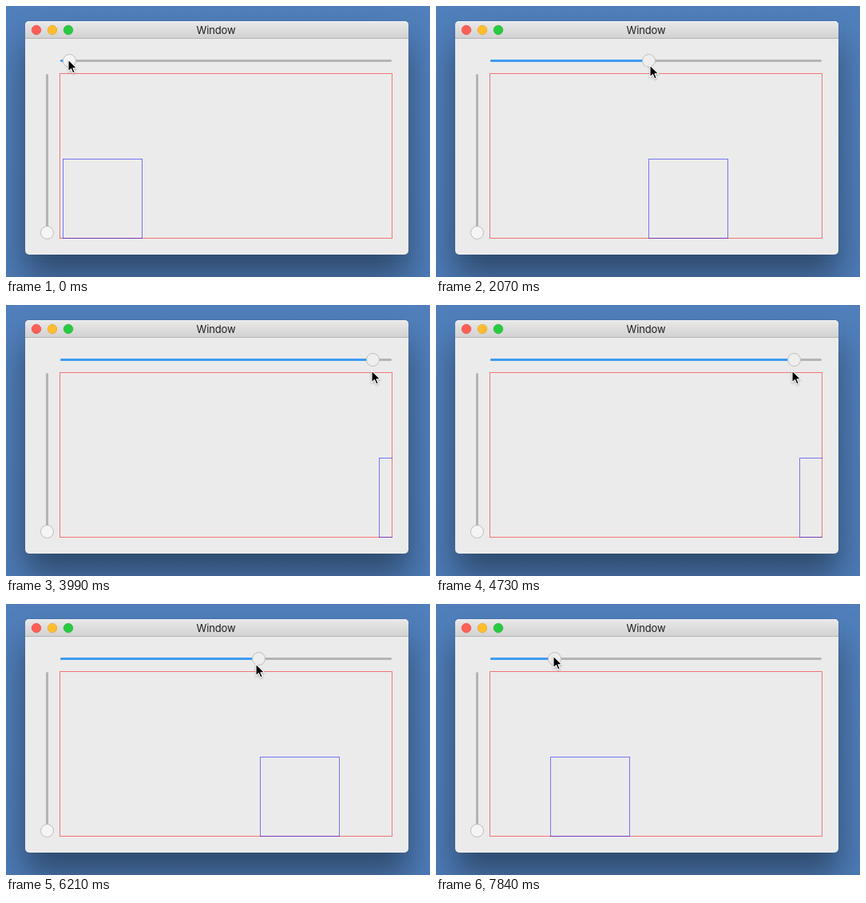
These frames come from a looping animation (531x339 px, 7990 ms). An HTML page:

```html
<!DOCTYPE html>
<html lang="en">
<head>
<meta charset="utf-8">
<title>Window</title>
<style>
  html, body { margin: 0; width: 531px; height: 339px; overflow: hidden; }
  body { position: relative; background: linear-gradient(#507fbb, #4d7bb6); }
  .window {
    position: absolute; left: 24px; top: 19px; width: 480px; height: 292px;
    border-radius: 5px; background: #ebebeb;
    box-shadow: 0 0 1px rgba(0, 0, 0, .3), 0 27px 40px rgba(0, 0, 0, .4);
  }
  .title {
    box-sizing: border-box; height: 22px; border-radius: 5px 5px 0 0;
    background: linear-gradient(#e9e9e9, #d2d2d2);
    border-bottom: 1px solid #b5b5b5; box-shadow: inset 0 1px #f4f4f4;
    font: 13px/22px Inter, Roboto, sans-serif; letter-spacing: -.15px;
    text-align: center; text-indent: -2px; color: #1e1e1e;
  }
  svg { position: absolute; left: 0; top: 0; }
  .knob { fill: #f5f5f5; stroke: #bdbdbd; }
  #arrow { filter: drop-shadow(0 1px 1px rgba(0, 0, 0, .3)); }
</style>
</head>
<body>
<div class="window"><div class="title">Window</div></div>
<svg width="531" height="339" viewBox="0 0 531 339">
  <defs>
    <clipPath id="view"><rect x="67" y="84" width="417" height="207"/></clipPath>
  </defs>
  <g stroke-width=".6">
    <circle cx="38" cy="30" r="5.8" fill="#ff5f57" stroke="#e0443e"/>
    <circle cx="58" cy="30" r="5.8" fill="#ffbd2e" stroke="#dea123"/>
    <circle cx="78" cy="30" r="5.8" fill="#28ca42" stroke="#1aab29"/>
  </g>
  <g fill="#b4b4b4">
    <rect x="68" y="67" width="415" height="3" rx="1.5"/>
    <rect x="50" y="85" width="3" height="198" rx="1.5"/>
  </g>
  <rect id="fill" x="68" y="67" height="3" rx="1.5" fill="#3f9af2"/>
  <circle class="knob" cx="51.5" cy="283.5" r="8"/>
  <circle class="knob" id="knob" cy="68.5" r="8"/>
  <rect x="67.5" y="84.5" width="416" height="206" fill="none" stroke="#f00" stroke-opacity=".5"/>
  <g clip-path="url(#view)">
    <rect id="box" y="191.5" width="99" height="99" fill="none" stroke="#00f" stroke-opacity=".5"/>
  </g>
  <path id="arrow" d="M0 0V15L3.5 11.7L5.8 17L8.3 16L6 10.8H10.8Z"
    fill="#000" stroke="#fff" stroke-width="1.1" stroke-linejoin="round"/>
</svg>
<script>
  const LOOP = 7990, STEP = 147.8, LAST = 53;

  // Drag path: step and left edge of the box at each turn or rest.
  const path = [
    [0, 71], [5, 110], [7, 110], [11, 204], [12, 204], [14, 266],
    [20, 363], [27, 467], [30, 483], [35, 414], [36, 414], [37, 413],
    [39, 356], [40, 356], [46, 241.5], [48, 206], [49, 206], [LAST, 143]
  ];

  const [fill, knob, box, arrow] =
    ['fill', 'knob', 'box', 'arrow'].map(id => document.getElementById(id));

  function leftAt(step) {
    const i = Math.max(1, path.findIndex(p => p[0] >= step));
    const [[s0, x0], [s1, x1]] = [path[i - 1], path[i]];
    return x0 + (x1 - x0) * (step - s0) / (s1 - s0);
  }

  // The hand sways around the knob, sinks to the right and rises on the way back.
  function pointerAt(step, left, x) {
    const sway = 2.3 * Math.sin(step / LAST * 2 * Math.PI) - 1.2;
    const rise = Math.max(0, step - 37) * .28;
    return [x + sway, 67 + (left - 71) * .038 - rise].map(Math.round);
  }

  function draw(time) {
    const step = Math.min(LAST, Math.floor((time % LOOP + 4) / STEP));
    const left = leftAt(step);
    const x = Math.floor(79.5 + (left - 71) * .96) + .5;
    const [px, py] = pointerAt(step, left, x);
    fill.setAttribute('width', x - 68);
    knob.setAttribute('cx', x);
    knob.style.fill = step ? '#eeeeee' : '#f5f5f5';
    box.setAttribute('x', Math.round(left) + .5);
    arrow.setAttribute('transform', `translate(${px} ${py})`);
  }

  const start = performance.now();
  function tick() {
    draw(performance.now() - start);
    requestAnimationFrame(tick);
  }
  tick();
</script>
</body>
</html>
```
